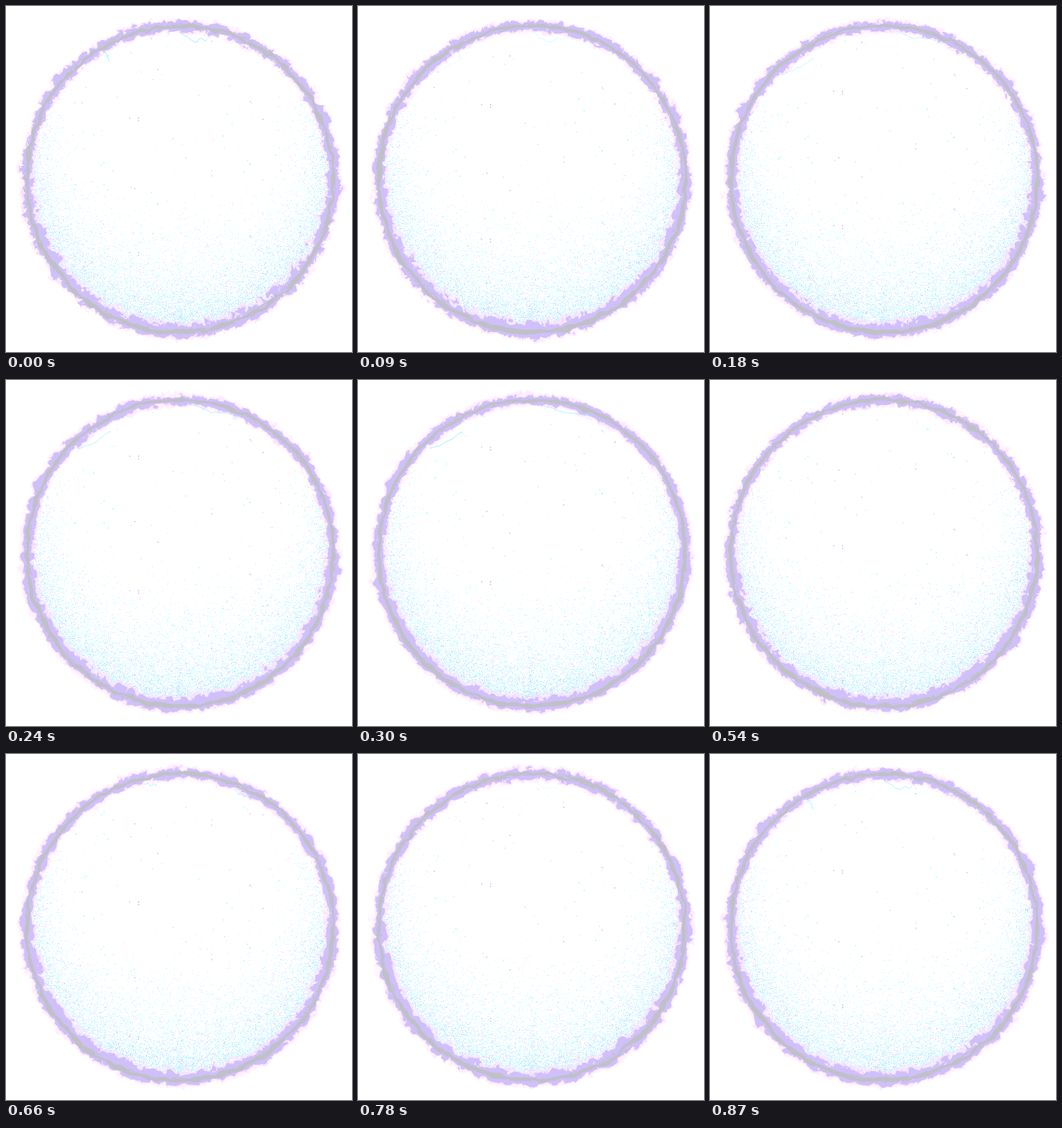
These frames come from a looping animation (540 by 540 pixels, 900 ms). An HTML page with a canvas:

```html
<!DOCTYPE html>
<html lang="en">
<head>
<meta charset="utf-8">
<title>Plasma ring</title>
<style>
  html, body { margin: 0; width: 100%; height: 100%; overflow: hidden; background: #fff; }
  canvas { display: block; width: 540px; height: 540px; }
</style>
</head>
<body>
<canvas id="stage" width="540" height="540"></canvas>
<script>
const SIZE = 540, CX = 271, CY = 269.5, R = 239;
const STEPS = 30, STEP_MS = 30;
const LAVENDER = [207, 192, 250], GRAY = [192, 192, 199], PINK = [255, 222, 255];
const CYAN = [164, 255, 255], WHITE = [255, 255, 255];

// Flares outside the ring: angle in degrees, step of their peak, strength
const FLARES = [
  [-140.5, 0, 0.8], [-23, 0, 0.75], [3, 0, 0.6], [143, 0, 0.4], [90, 0, 0.5],
  [-154, 8, 0.75], [169, 12, 0.65], [7, 7, 0.6], [-38, 5, 0.5],
  [34.5, 18, 0.7], [-10, 19, 0.5], [58, 22, 0.5], [-178, 20, 0.4]
];

const ctx = document.getElementById('stage').getContext('2d');
const frames = [];

const clamp = v => Math.max(0, Math.min(1, v));
const smooth = (a, b, v) => { v = clamp((v - a) / (b - a)); return v * v * (3 - 2 * v); };
const mix = (a, b, k) => a + (b - a) * k;

function hash(a, b, c) {
  let h = Math.imul(a, 374761393) + Math.imul(b, 668265263) + Math.imul(c, 1274126177) | 0;
  h = Math.imul(h ^ h >>> 13, 1274126177);
  h = Math.imul(h ^ h >>> 15, 2246822519);
  return ((h ^ h >>> 16) >>> 0) / 4294967296;
}

const values = Float32Array.from({ length: 256 }, (_, i) => hash(i, 3, 7));
const perm = Array.from({ length: 256 }, (_, i) => i)
  .sort((a, b) => hash(a, 11, 5) - hash(b, 11, 5));

const lattice = (x, y, z) => values[perm[perm[x & 255] + y & 255] + z * 37 & 255];

// Value noise in x and y that repeats in z after `period`
function noise(x, y, z, period) {
  const ix = Math.floor(x), iy = Math.floor(y), iz = Math.floor(z);
  let fx = x - ix, fy = y - iy, fz = z - iz;
  fx *= fx * (3 - 2 * fx);
  fy *= fy * (3 - 2 * fy);
  const plane = k => mix(
    mix(lattice(ix, iy, k), lattice(ix + 1, iy, k), fx),
    mix(lattice(ix, iy + 1, k), lattice(ix + 1, iy + 1, k), fx), fy);
  return mix(plane(iz % period), plane((iz + 1) % period), fz);
}

function flareAt(angle, step) {
  let sum = 0;
  for (const [deg, peak, power] of FLARES) {
    const da = Math.abs((angle - deg + 540) % 360 - 180);
    if (da > 7) continue;
    const dt = Math.abs((step - peak + 45) % STEPS - 15);
    sum += power * Math.exp(-da * da / 7 - dt * dt / 18);
  }
  return sum;
}

// Rising dust: every column scrolls up at its own whole speed
function dust(x, y, d, g, step) {
  const depth = -d;
  const spread = 18 + 28 * Math.max(0, g + 0.1);
  let cover = 0.66 * smooth(-0.6, 0.12, g) * Math.exp(-depth / spread)
    + 0.035 * smooth(0, 0.7, g) + 0.0008;
  if (g > 0.3) cover *= 1 + 0.6 * Math.exp(-Math.abs(x - 270) / 5);

  const speed = 7 + Math.floor(hash(x, 1, 2) * 3);
  const row = (y + speed * step) % (speed * STEPS);
  const h = hash(x, row, 3);
  let key = 0;
  if (h < cover) key = hash(x, row, 4);
  else {
    const col = x >> 1, v = 7 + Math.floor(hash(col, 5, 6) * 2);
    const cell = (y + v * step) % (v * STEPS) >> 1;
    if (hash(col, cell, 8) > 0.0022) return null;
    key = hash(col, cell, 9);
  }
  const violet = 0.24 + 0.45 * Math.exp(-depth / 11);
  const base = key < violet ? LAVENDER : key > 0.94 ? PINK : CYAN;
  return [base, 0.45 + 0.55 * hash(x, row, 10)];
}

function ring(x, y, d, g, step) {
  const t = step / STEPS;
  const wx = x + 9 * noise(y / 6, x / 6, t * 6, 6);
  const wy = y + 9 * noise(x / 6 + 70, y / 6, t * 6, 6);
  const big = noise(wx / 10, wy / 10, t * 8, 8);
  const fine = noise(wx / 3.6 + 40, wy / 3.6, t * 10, 10);
  const n = 0.62 * big + 0.38 * fine - 0.5;

  const width = d > 0 ? 10.5 : 10 + 6 * smooth(-0.3, 0.6, g);
  let s = 1 - Math.abs(d) / width + 1.5 * n;
  if (d > 3) s += flareAt(Math.atan2(y - CY, x - CX) * 180 / Math.PI, step);

  const bend = noise(x / 13 + 90, y / 13, t * 8, 8) - 0.5;
  const thick = 1.3 + 3.6 * big * (0.75 + 0.35 * smooth(-0.2, 0.8, g));
  const core = thick - Math.abs(d + 7 * bend);
  const strand = 1.1 - Math.abs(d - 9 * (fine - 0.5) - 6 * bend);
  return [s, clamp(Math.max(core, strand) * 0.8 + 0.3)];
}

function render(step) {
  const img = new ImageData(SIZE, SIZE), px = img.data;
  px.fill(255);
  for (let y = 0; y < SIZE; y++) {
    const g = (y - CY) / R;
    for (let x = 0; x < SIZE; x++) {
      const d = Math.hypot(x - CX, y - CY) - R;
      if (d > 25) continue;
      let rgb = WHITE;
      const paint = (c, k) => { rgb = rgb.map((v, i) => mix(v, c[i], k)); };

      if (d < -3) {
        const dot = dust(x, y, d, g, step);
        if (dot) paint(...dot);
      }
      if (d > -30) {
        const [s, core] = ring(x, y, d, g, step);
        if (s > -0.25) paint(PINK, clamp((s + 0.25) * 1.7));
        if (s > 0.2) paint(LAVENDER, clamp((s - 0.2) * 7));
        if (core > 0) paint(GRAY, core);
      }
      if (rgb !== WHITE) px.set(rgb, (y * SIZE + x) * 4);
    }
  }
  return img;
}

// Thin crackling arc between two points, sagging in the middle
function bolt(x0, y0, x1, y1, sag, seed, step, alpha) {
  if (alpha <= 0) return;
  ctx.globalAlpha = alpha;
  ctx.beginPath();
  for (let i = 0; i <= 14; i++) {
    const k = i / 14;
    const jag = 7 * (noise(i * 0.7 + seed, seed, step / STEPS * 8, 8) - 0.5);
    ctx.lineTo(mix(x0, x1, k), mix(y0, y1, k) + sag * Math.sin(Math.PI * k) + jag);
  }
  ctx.stroke();
}

function draw(step) {
  ctx.globalAlpha = 1;
  ctx.putImageData(frames[step] || (frames[step] = render(step)), 0, 0);
  ctx.strokeStyle = 'rgb(150,240,252)';
  ctx.lineWidth = 1;
  const wrap = Math.min(step, STEPS - step);
  bolt(270, 37, 314, 50, 10, 5, step, 1 - wrap / 5);
  bolt(152, 70, 162, 84, 0, 23, step, 1 - wrap / 4);
  bolt(278 + step, 39, 366, 56, 3, 31, step, 0.9 - Math.abs(step - 9) / 9);
  bolt(96 + step * 1.6, 108, 160 + step * 0.4, 82, 2, 47, step, 1 - Math.abs(step - 10) / 9);
  bolt(216, 45, 236, 48, 2, 61, step, 0.8 - Math.abs(step - 22) / 4);
  bolt(358, 58, 384, 70, 1, 77, step, 0.8 - Math.abs(step - 22) / 5);
}

let shown = -1;
function tick() {
  const step = Math.floor(performance.now() / STEP_MS) % STEPS;
  if (step !== shown) draw(shown = step);
  requestAnimationFrame(tick);
}
tick();
</script>
</body>
</html>
```
